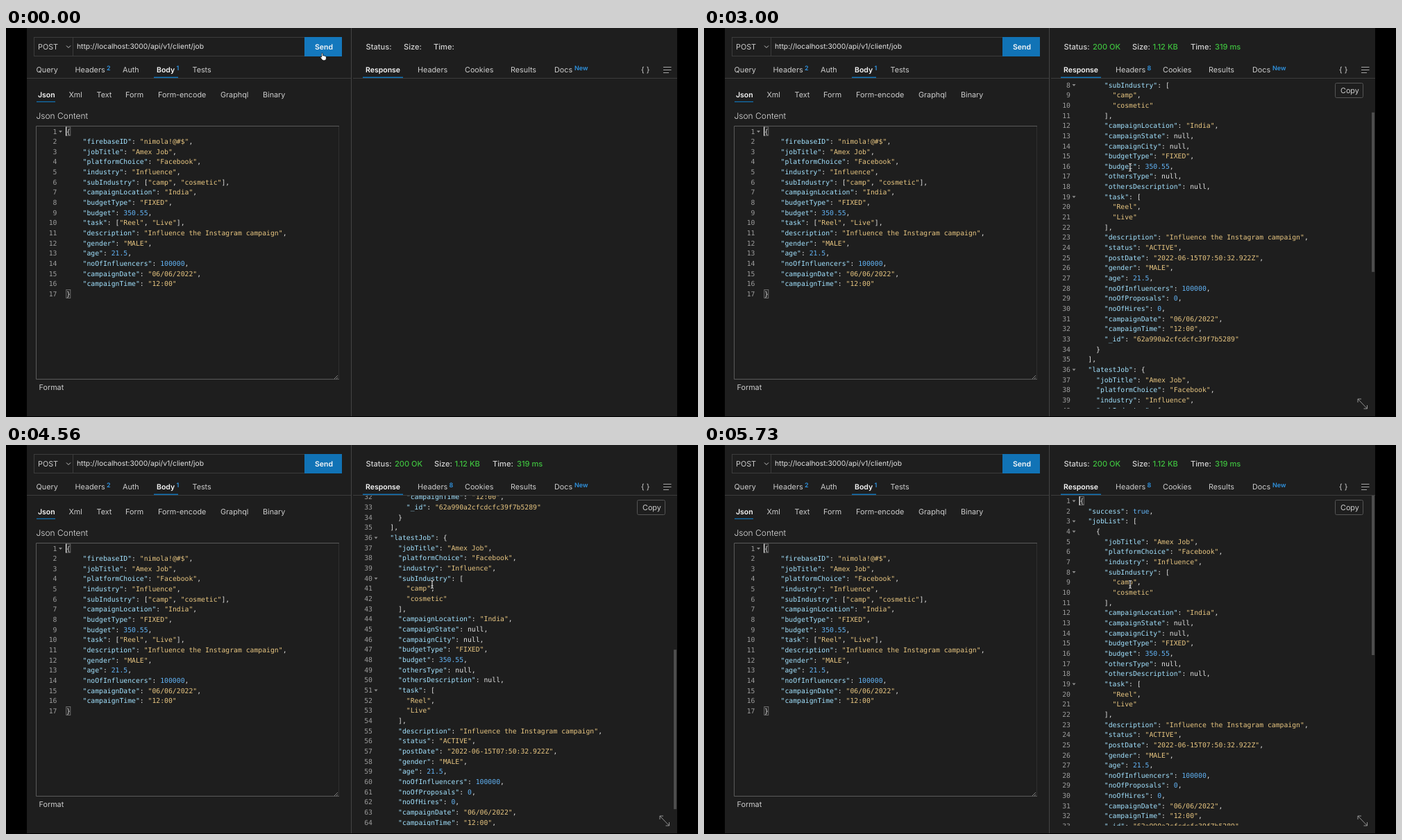
Write an HTML page that moves like this. It is 997 px wide and 561 px high and loops after 6.18 s.

```html
<!DOCTYPE html>
<html lang="en">
<head>
<meta charset="utf-8">
<title>API client</title>
<style>
@property --s { syntax: '<number>'; inherits: true; initial-value: 0; }
html, body { margin: 0; width: 100%; height: 100%; overflow: hidden; background: #000; }
svg { display: block; }
text { font: 400 10.8px Inter, sans-serif; fill: #cdcdcd; white-space: pre; text-rendering: geometricPrecision; }
.on { font-weight: 600; font-size: 10.5px; fill: #f8f8f8; }
.url { font-size: 10.3px; fill: #e4e4e4; }
.title { font-size: 12px; font-weight: 300; fill: #dedede; }
.meta { font-size: 11.1px; font-weight: 500; fill: #d2d2d2; }
.ok { fill: #3fc13f; }
.sup { font-size: 9px; font-weight: 600; fill: #2f93e0; }
.code text { font: 9.77px "DejaVu Sans Mono", monospace; fill: #e2e2e2; }
.code .no { fill: #9c9c9c; text-anchor: end; }
.key { fill: #a2e2ff; }
.str { fill: #e8c681; }
.num { fill: #62b4f6; }
.line { stroke: #3c3c3c; fill: none; }

.before, .after, .hot, .hand, .beam, .copy, .mouse, .scroll { animation: 6180ms linear infinite; }
.before, .after, .hot, .hand, .beam, .copy { animation-timing-function: step-end; }
.before { animation-name: before; }
.after { animation-name: after; }
.hot { animation-name: hot; }
.hand { animation-name: hand; }
.beam, .copy { animation-name: beam; }
.mouse { animation-name: mouse; }
.scroll { animation-name: scroll; }
.body { transform: translateY(calc(var(--s) * -1px)); }
.thumb { transform: translateY(calc(var(--s) * .483px)); }

@keyframes before { 0% { opacity: 1 } 19.42%, 100% { opacity: 0 } }
@keyframes after { 0% { opacity: 0 } 19.42%, 100% { opacity: 1 } }
@keyframes hot { 0% { opacity: 1 } 30.1%, 100% { opacity: 0 } }
@keyframes hand { 0% { opacity: 1 } 32.52%, 100% { opacity: 0 } }
@keyframes beam { 0% { opacity: 0 } 32.52%, 100% { opacity: 1 } }
@keyframes mouse {
  0%, 29.13% { transform: translate(457px, 41px); animation-timing-function: ease-in-out; }
  35.92%, 100% { transform: translate(614px, 201px); }
}
@keyframes scroll {
  0% { --s: 0; }
  43.69% { --s: 0; animation-timing-function: cubic-bezier(.5, 0, .8, .5); }
  48.54% { --s: 100; }
  52.43% { --s: 305; animation-timing-function: cubic-bezier(.1, .6, .4, 1); }
  63.11% { --s: 391; animation-timing-function: ease-in-out; }
  68.45% { --s: 460; }
  76.05% { --s: 460; animation-timing-function: ease-in; }
  78.64% { --s: 456; animation-timing-function: cubic-bezier(.4, .1, .4, 1); }
  91.26%, 100% { --s: 0; }
}
</style>
</head>
<body>
<svg id="stage" width="997" height="561" viewBox="0 0 997 561"></svg>
<script>
const CHAR = 5.88, ROW = 14.66;

const request = `{
    "firebaseID": "nimola!@#$",
    "jobTitle": "Amex Job",
    "platformChoice": "Facebook",
    "industry": "Influence",
    "subIndustry": ["camp", "cosmetic"],
    "campaignLocation": "India",
    "budgetType": "FIXED",
    "budget": 350.55,
    "task": ["Reel", "Live"],
    "description": "Influence the Instagram campaign",
    "gender": "MALE",
    "age": 21.5,
    "noOfInfluencers": 100000,
    "campaignDate": "06/06/2022",
    "campaignTime": "12:00"
}`;

const job = {
  jobTitle: 'Amex Job', platformChoice: 'Facebook', industry: 'Influence',
  subIndustry: ['camp', 'cosmetic'], campaignLocation: 'India',
  campaignState: null, campaignCity: null, budgetType: 'FIXED', budget: 350.55,
  othersType: null, othersDescription: null, task: ['Reel', 'Live'],
  description: 'Influence the Instagram campaign', status: 'ACTIVE',
  postDate: '2022-06-15T07:50:32.922Z', gender: 'MALE', age: 21.5,
  noOfInfluencers: 100000, noOfProposals: 0, noOfHires: 0,
  campaignDate: '06/06/2022', campaignTime: '12:00', _id: '62a990a2cfcdcfc39f7b5289'
};
const response = JSON.stringify({ success: true, jobList: [job], latestJob: job }, null, 2);

const text = (x, y, str, cls = '') => `<text x="${x}" y="${y}" class="${cls}">${str}</text>`;
const row = (y, items) => items.map(([x, str, cls]) => text(x, y, str, cls)).join('');
const rect = (x, y, w, h, fill, extra = '') =>
  `<rect x="${x}" y="${y}" width="${w}" height="${h}" fill="${fill}" ${extra}/>`;
const path = (d, extra = 'class="line"') => `<path d="${d}" ${extra}/>`;
const bracket = (x, y) => rect(x, y, 6, 12, 'none', 'stroke="#808080" stroke-width=".8"');
const caret = (x, y) => rect(x, y, 1.2, 13, '#f0f0f0');

function paint(line) {
  return line.replace(/("[^"]*")(:?)|\b(?:true|\d[\d.]*)/g, (all, str, colon) =>
    str ? `<tspan class="${colon ? 'key' : 'str'}">${str}</tspan>${colon}`
        : `<tspan class="num">${all}</tspan>`);
}

function editor(src, x, y, noX, folds) {
  return src.split('\n').map((line, i) => {
    const base = y + i * ROW, indent = line.search(/\S/);
    const fold = folds && /[{[]$/.test(line)
      ? path(`M${noX + 2.5} ${base - 4.5}h5l-2.5 3z`, 'fill="#8c8c8c"') : '';
    return text(noX, base, i + 1, 'no') + fold +
      text(x + indent * CHAR, base, paint(line.trim()));
  }).join('');
}

const frame =
  rect(30, 0, 937, 560, '#1e1e1e') +
  path('M497.5 0V560', 'stroke="#444"') +
  path('M30 72.5H497M500 72.5H967') +
  path('M40.5 13.5H430M40.5 40.5H430M40.5 13V41M96.5 13V41') +
  rect(430, 13, 54, 28, '#1173b6') +
  rect(430, 13, 54, 28, '#1478bd', 'class="hot"') +
  path('M87 25.5l3 3 3-3', 'fill="none" stroke="#c4c4c4"') +
  rect(213, 70.5, 35, 1.5, '#1173b6') + rect(514, 70.5, 58, 1.5, '#1173b6') +
  rect(44, 105.8, 27, 1.2, '#1173b6') +
  path('M479.5 141V507', 'stroke="#303030"') +
  path('M480 141.5H43.5V506.5H480', 'fill="none" stroke="#5a5a5a"') +
  path('M473 506l5-5M476 506l2-2', 'stroke="#999" stroke-width=".8"') +
  path('M947 56.5h11.5M947 60.5h11.5M947 64.5h8', 'stroke="#b4b4b4" stroke-width=".9"');

const labels =
  row(30.5, [[46, 'POST'], [445, 'Send', 'on']]) +
  text(102, 30, 'http://localhost:3000/api/v1/client/job', 'url') +
  row(64, [
    [43.5, 'Query'], [99.5, 'Headers'], [168, 'Auth'], [217, 'Body', 'on'], [268.5, 'Tests'],
    [518, 'Response', 'on'], [593, 'Headers'], [661, 'Cookies'], [727, 'Results'],
    [790, 'Docs'], [915, '{ }']
  ]) +
  row(61, [[145, '2', 'sup'], [245.5, '1', 'sup'], [819, 'New', 'sup']]) +
  row(100, [
    [46, 'Json', 'on'], [90.5, 'Xml'], [130.5, 'Text'], [172, 'Form'],
    [219, 'Form-encode'], [309, 'Graphql'], [370, 'Binary']
  ]) +
  text(43.5, 131, 'Json Content', 'title') +
  text(47.5, 521.5, 'Format');

const left = `<g class="code">${editor(request, 87, 152.5, 73.5, false)}
  ${path('M76 148h5l-2.5 3z', 'fill="#8c8c8c"')}
  ${bracket(86.8, 143)}${bracket(86.8, 377.5)}${caret(86, 142.5)}</g>`;

const waiting = `<g class="before">${row(31, [
  [518.5, 'Status:', 'meta'], [573, 'Size:', 'meta'], [616, 'Time:', 'meta']])}</g>`;

const result = `<g class="after">
  ${row(31, [
    [518.5, 'Status:', 'meta'], [560, '200 OK', 'meta ok'], [617, 'Size:', 'meta'],
    [646.5, '1.12 KB', 'meta ok'], [701, 'Time:', 'meta'], [736, '319 ms', 'meta ok']])}
  ${text(638.5, 61, '8', 'sup')}
  <g class="scroll">
    <g clip-path="url(#view)"><g class="body code">
      ${editor(response, 541.5, 84, 528, true)}${bracket(541.3, 74.5)}${caret(540.5, 74)}
    </g></g>
    ${rect(962, 73, 4, 230, '#4d4d4d', 'class="thumb"')}
  </g>
  ${path('M942 535l13.5 14M942 540v-5h5M955.5 544v5h-5', 'fill="none" stroke="#a0a0a0" stroke-width=".9"')}
</g>`;

const copy = `<g class="copy">
  ${rect(909.5, 79.5, 40, 21, '#1e1e1e', 'rx="2" stroke="#555"')}${text(917, 94, 'Copy')}</g>`;

const hand = path('M-2.3 1.2V-3.7q0-1 .9-1 .9 0 .9 1V-1q1.2-.6 1.8.2 1.2-.4 1.6.5 1.5-.2 1.5 1.2V3q0 2.8-2.8 2.8H.2Q-1 5.8-2.2 4L-3.9 1.6q-.4-1 .5-1.2.6 0 1.1.8z',
  'class="hand" fill="#fff" stroke="#000" stroke-width=".7"');
const beamShape = 'M-2-5.5Q0-5.5 0-4V4Q0 5.5-2 5.5M2-5.5Q0-5.5 0-4M2 5.5Q0 5.5 0 4M-1.5 2h3';
const beam = `<g class="beam" fill="none">${path(beamShape, 'stroke="#111" stroke-width="2.4"')}${
  path(beamShape, 'stroke="#eee" stroke-width="1.1"')}</g>`;

document.getElementById('stage').innerHTML =
  '<clipPath id="view"><rect x="500" y="73" width="461" height="476"/></clipPath>' +
  frame + labels + left + waiting + result + copy + `<g class="mouse">${hand}${beam}</g>`;
</script>
</body>
</html>
```
